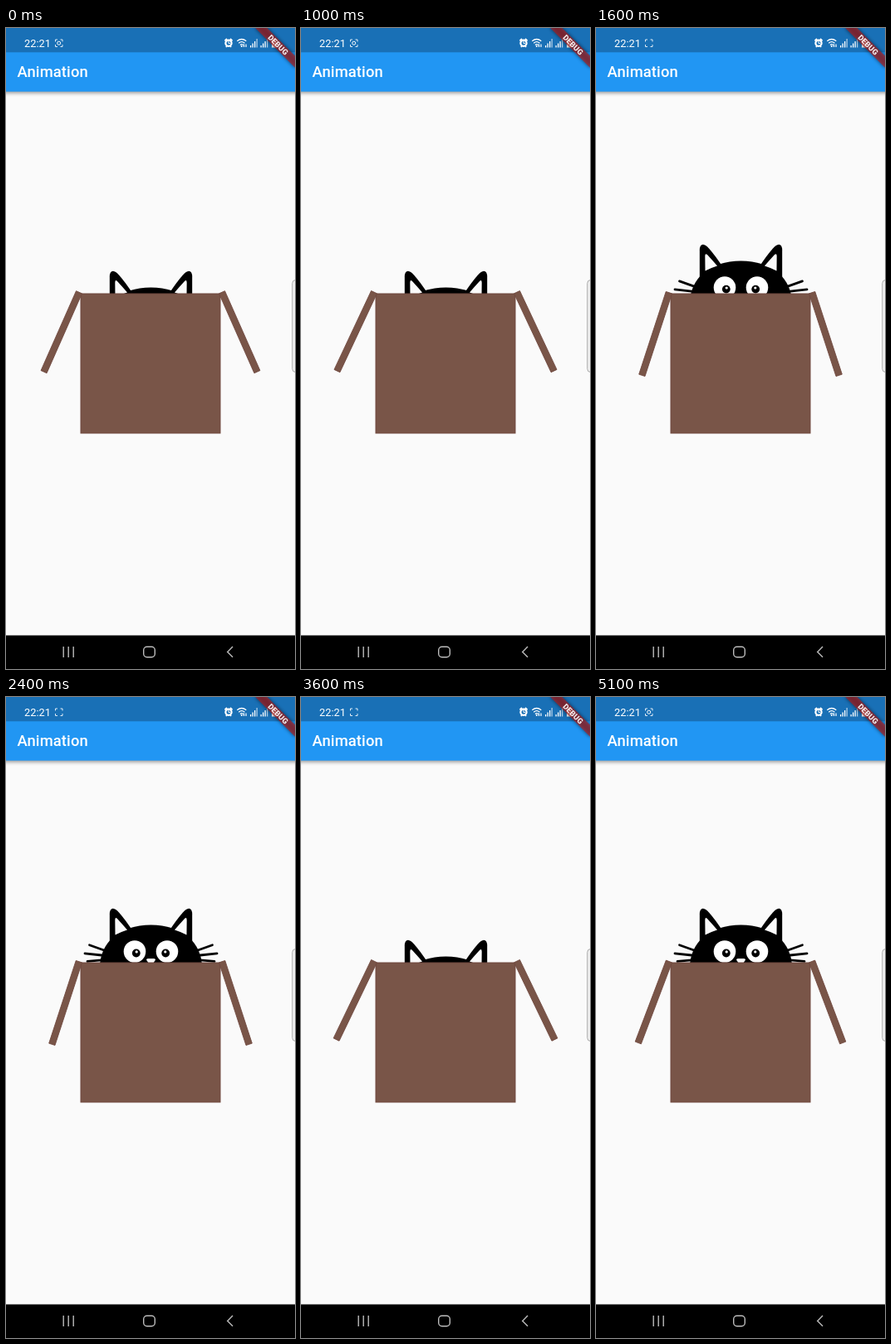
Recreate the animation shown at these times as an HTML page. Size 348 px wide and 772 px high, loop 5200 ms.

```html
<!DOCTYPE html>
<html lang="en">
<head>
<meta charset="utf-8">
<title>Animation</title>
<style>
  html, body { margin: 0; height: 100%; overflow: hidden; background: #fafafa; }
  svg { display: block; width: 100vw; height: 100vh; font-family: Roboto, sans-serif; }
  .card { fill: #795548; stroke: #70483f; }
</style>
</head>
<body>
<svg viewBox="0 0 348 772">
  <defs>
    <filter id="soft" x="-20%" y="-50%" width="140%" height="200%"><feGaussianBlur stdDeviation="2"/></filter>
    <g id="half">
      <path d="M124.8 298 L124.8 262 Q125 255 129 255.2 Q132 255.5 136 260 Q144 269 153 283 L150 300Z"/>
      <path d="M131.5 287 L131.3 269 Q131.5 265 134 267.5 Q140 274 146 281 Q138 283.5 131.5 287Z" fill="#fafafa"/>
      <path d="M100.5 299.3 L118 305.5 M95 309.3 L115 311.5 M98 318.8 L115 317.3" stroke="#000" stroke-width="2.8" stroke-linecap="round"/>
      <circle cx="155" cy="307" r="13.3" fill="#fff"/>
      <circle cx="156.8" cy="309" r="4.9"/>
      <circle cx="157.2" cy="307.4" r="1.6" fill="#fff"/>
    </g>
    <rect id="flap" class="card" x=".4" y=".4" width="104.8" height="7.65" stroke-width=".8"/>
    <g id="signal" fill="#fff">
      <path d="M0 21h1.3v2.5h-1.3z M2.5 18.5h1.3v5h-1.3z M5 16h1.3v7.5h-1.3z"/>
      <path d="M7.5 13h1.3v10.5h-1.3z" opacity=".65"/>
    </g>
  </defs>

  <rect width="348" height="772" fill="#fafafa"/>

  <g id="cat">
    <path d="M113 326 C113 296 137 275 174.5 275 S236 296 236 326Z"/>
    <use href="#half"/>
    <use href="#half" transform="matrix(-1 0 0 1 349 0)"/>
    <path d="M169 317 Q169 315.5 171 315.5 H178 Q180 315.5 180 317 L176 323 H173Z" fill="#fff"/>
  </g>
  <rect class="card" x="90" y="320" width="168" height="168"/>
  <use href="#flap" id="left"/>
  <use href="#flap" id="right"/>

  <rect x="344.8" y="303.5" width="12" height="111" rx="4" fill="#f0f0f0" stroke="#a8a8a8"/>

  <rect x="-9" y="32" width="366" height="46.5" filter="url(#soft)" opacity=".38"/>
  <rect width="348" height="76.6" fill="#2196f3"/>
  <rect width="348" height="29.3" fill="#1970b6"/>
  <text x="13.5" y="59" font-size="18.4" font-weight="500" fill="#fff" letter-spacing=".13">Animation</text>

  <text x="22" y="22.7" font-size="12.8" fill="#fff">22:21</text>
  <g fill="none" stroke="#fff" stroke-width="1">
    <path d="M59.5 16.5v-2.5h2.5 M65.5 14h2.5v2.5 M68 20v2.5h-2.5 M62 22.5h-2.5v-2.5" opacity=".85"/>
    <circle id="blink" cx="63.7" cy="18.2" r="2"/>
    <circle cx="268" cy="18.3" r="3.6" stroke-width="2.2"/>
    <path d="M263.5 15.5l2.5-2.5 M272.5 15.5l-2.5-2.5 M265 23l1-1.5 M271 23l-1-1.5" stroke-width="1.8"/>
    <path d="M268 16v2.5h2"/>
    <path d="M278.3 15.8q5.5-4.6 11 0 M280.2 18.2q3.6-3 7.2 0 M282 20.4q1.8-1.4 3.6 0" stroke-width="1.3"/>
    <path d="M286.5 23v-3.5 M289 19.5v3.5" stroke-width="1.2"/>
  </g>
  <circle cx="283.8" cy="22" r="1.1" fill="#fff"/>
  <use href="#signal" x="294"/>
  <use href="#signal" x="306.5"/>
  <path d="M320 14h1.7v-1.5h2.6v1.5h1.7v9.5h-6z" fill="#fff"/>

  <g transform="translate(348 0) rotate(45)">
    <rect x="-33.8" y="23.7" width="67.6" height="10.1" filter="url(#soft)" opacity=".55"/>
    <rect x="-33.8" y="23.7" width="67.6" height="10.1" fill="#b71c1c" fill-opacity=".627"/>
    <text y="32" font-size="9.3" font-weight="900" fill="#fff" fill-opacity=".9" text-anchor="middle">DEBUG</text>
  </g>

  <rect y="731.5" width="348" height="41"/>
  <g fill="none" stroke="#bcbcbc" stroke-width="1.4">
    <path d="M69.2 745v13 M75.2 745v13 M81.2 745v13"/>
    <rect x="165.7" y="745.2" width="13.6" height="12.6" rx="4"/>
    <path d="M273 745l-6.3 6.4 6.3 6.4"/>
  </g>
</svg>
<script>
  const LOOP = 5200, STEP = 100, SWING = 305, POP = 200;
  const POP_UP = 1420, DROP = 2605, POP_AGAIN = 3708;
  const [cat, left, right, blink] =
    ['cat', 'left', 'right', 'blink'].map(id => document.getElementById(id));
  const clamp = x => Math.min(1, Math.max(0, x));

  // Cubic bezier easing with control points (a, 0) and (b, 1)
  function ease(x, a, b) {
    let lo = 0, hi = 1, s;
    for (let i = 0; i < 24; i++) {
      s = (lo + hi) / 2;
      const r = 1 - s;
      if (3 * a * s * r * r + 3 * b * s * s * r + s ** 3 < x) lo = s; else hi = s;
    }
    return s * s * (3 - 2 * s);
  }

  // Flaps swing between 108 and 117 degrees and freeze while the cat is out
  function flapAngle(t) {
    const local = t < DROP ? Math.min(t, POP_UP) + 2 * SWING - 180 : Math.min(t, POP_AGAIN) - DROP;
    const v = 1 - Math.abs(local / SWING % 2 - 1);
    return 108 + 9 * ease(v, 0.42, 0.58);
  }

  function catHeight(t) {
    const v = t < DROP ? (t - POP_UP) / POP
      : t < POP_AGAIN ? 1 - (t - DROP) / POP
      : (t - POP_AGAIN) / POP;
    return ease(clamp(v), 0.42, 1);
  }

  function draw() {
    const t = Math.floor(performance.now() % LOOP / STEP) * STEP;
    const angle = flapAngle(t);
    cat.setAttribute('transform', `translate(0 ${38 * (1 - catHeight(t)) - 0.5})`);
    left.setAttribute('transform', `translate(92 319.6) rotate(${angle})`);
    right.setAttribute('transform', `translate(256 319.6) scale(-1 1) rotate(${angle})`);
    blink.style.opacity = Math.floor((t + 100) / 500) % 2 ? 0 : 1;
    requestAnimationFrame(draw);
  }
  draw();
</script>
</body>
</html>
```
